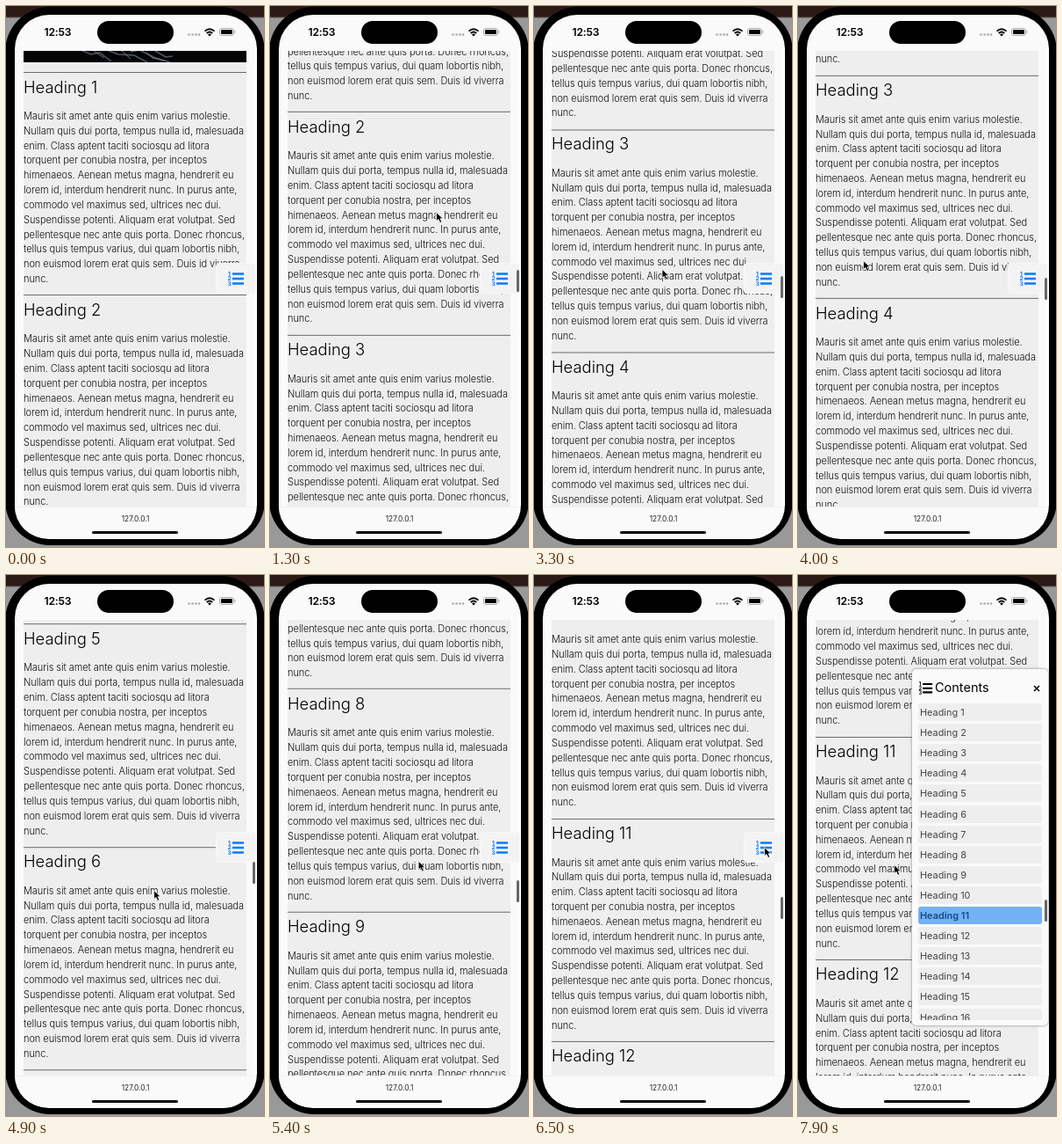
An HTML page for the animation above (8 s loop, 294 by 615 pixels).

```html
<!DOCTYPE html>
<html lang="en">
<head>
<meta charset="utf-8">
<title>Table of contents demo</title>
<style>
html, body { margin: 0; width: 100%; height: 100%; overflow: hidden; }
body { position: relative; background: linear-gradient(#2c1a16 12px, #999 14px); font-family: Inter, Roboto, sans-serif; color: #000; }
div, svg, h2, p { position: absolute; margin: 0; box-sizing: border-box; white-space: nowrap; }
#phone { left: -1px; top: 1px; width: 296px; height: 612px; border-radius: 51px; background: #000; }
#screen { left: 9.5px; top: 9.5px; width: 276px; height: 596px; border-radius: 39px; background: #fafafa; }
#view { left: 0; top: 51px; width: 294px; height: 518px; overflow: hidden; }
#page { left: 20px; top: 24px; width: 254px; height: 6000px; }
#page::before { content: ""; position: absolute; top: -311px; width: 100%; height: 6311px; background: #eee; }
#photo { top: -311px; width: 254px; height: 300px; overflow: hidden; background: #030405; }
.section { left: 0; width: 254px; height: 253px; border-top: 1px solid #6b6b6b; }
h2 { top: 3.5px; font: 300 18.4px/24px Inter, Roboto, sans-serif; }
p { top: 41px; font-size: 11px; font-weight: 300; line-height: 16.83px; letter-spacing: -.06px; color: #111; }
#clock { left: 43.5px; top: 22px; font-size: 12.2px; font-weight: 600; line-height: 16px; letter-spacing: -.2px; }
#island { left: 104px; top: 17px; width: 87px; height: 26px; border-radius: 13px; background: #000; }
#status { left: 206px; top: 22px; }
#bar { left: 10px; top: 569px; width: 275px; height: 36px; border-radius: 0 0 39px 39px; background: #fafafaf4; border-top: 1px solid #f1f1f1; font-size: 8.3px; line-height: 27px; text-align: center; color: #222; }
#home { left: 98px; top: 596.5px; width: 98px; height: 3px; border-radius: 2px; background: #000; }
#button { left: 239px; top: 292px; width: 46px; height: 35px; border-radius: 4px 0 0 4px; background: #f3f3f3; border: 1px solid #f8f8f8; }
#button svg { left: 12px; top: 8px; color: #087bff; }
#panel { left: 130px; top: 107px; width: 155px; height: 405px; border-radius: 5px; background: #fafafa; box-shadow: 0 0 3px #777; transform-origin: 100% 50%; }
#panel .icon { left: 7px; top: 14px; width: 17px; height: 17px; }
#title { left: 26px; top: 12px; font-size: 14.5px; line-height: 18px; }
#close { left: 138px; top: 18px; }
#list { left: 7px; top: 39px; width: 141px; height: 360px; overflow: hidden; }
.item { left: 0; width: 141px; height: 20px; padding-left: 2px; border-radius: 3px; background: #eee; color: #444; font-size: 10.9px; line-height: 20px; }
.item.on { background: #73b1f6; color: #164b82; font-weight: 600; }
#thumb { left: 281px; width: 2.5px; height: 25px; border-radius: 2px; background: #666; }
#cursor { left: 0; top: 0; }
</style>
</head>
<body>
<div id="phone"></div>
<div id="screen"></div>
<div id="view">
  <div id="page">
    <div id="photo">
      <svg width="254" height="300" fill="none" stroke="#4d5962" stroke-width="1.5">
        <path d="M65 286l12 5 10-2 13 10M92 285l16 6 18 1 15 8M122 288l10-2 18 9 17 5M150 287l12 7 8-1"/>
        <path stroke="#8b9296" stroke-width=".8" d="M80 287l12 8M112 287l10 9M140 289l7 6 14 3"/>
      </svg>
    </div>
  </div>
</div>
<div id="clock">12:53</div>
<div id="island"></div>
<svg id="status" width="60" height="16">
  <g fill="#aaa"><circle cx="2.5" cy="10.5" r="1.3"/><circle cx="6.5" cy="10.5" r="1.3"/><circle cx="10.5" cy="10.5" r="1.3"/><circle cx="14" cy="10.5" r="1.3"/></g>
  <g fill="none" stroke="#000" stroke-width="1.8"><path d="M20.5 6.7Q26 1.7 31.5 6.7M22.7 9Q26 6 29.3 9"/></g>
  <path d="M24 10.4Q26 8.8 28 10.4L26 12.4z"/>
  <rect x="37.5" y="3.5" width="16" height="8" rx="2.5" fill="none" stroke="#aaa"/>
  <rect x="39" y="5" width="13" height="5" rx="1.2"/>
  <path d="M55 6v3" stroke="#aaa"/>
</svg>
<div id="bar">127.0.0.1</div>
<div id="home"></div>
<div id="button"></div>
<div id="panel">
  <div id="title">Contents</div>
  <svg id="close" width="8" height="8"><path d="M1 1l6 6M7 1l-6 6" stroke="#000" stroke-width="1.5"/></svg>
  <div id="list"></div>
</div>
<div id="thumb"></div>
<svg id="cursor" width="12" height="16"><path d="M.6 .6V10.5L3 8.4 4.8 12.4 6.8 11.5 5 7.7H8.2z" fill="#000" stroke="#fff" stroke-width=".8"/></svg>
<script>
const $ = id => document.getElementById(id);
const LOOP = 8000, PITCH = 253.35, OPEN = 6600;
const LINES = [
  'Mauris sit amet ante quis enim varius molestie.',
  'Nullam quis dui porta, tempus nulla id, malesuada',
  'enim. Class aptent taciti sociosqu ad litora',
  'torquent per conubia nostra, per inceptos',
  'himenaeos. Aenean metus magna, hendrerit eu',
  'lorem id, interdum hendrerit nunc. In purus ante,',
  'commodo vel maximus sed, ultrices nec dui.',
  'Suspendisse potenti. Aliquam erat volutpat. Sed',
  'pellentesque nec ante quis porta. Donec rhoncus,',
  'tellus quis tempus varius, dui quam lobortis nibh,',
  'non euismod lorem erat quis sem. Duis id viverra',
  'nunc.'
].join('<br>');

const listIcon = `<svg class="icon" width="20" height="20" viewBox="0 0 20 20" fill="currentColor">
  <path d="M6 2.3h13v2.5H6zM6 7.8h13v2.5H6zM6 13.3h13v2.5H6z"/>
  <g font-size="6.6" font-weight="700"><text x="1" y="5.6">1</text><text x=".6" y="11.4">2</text><text x=".6" y="17.2">3</text></g></svg>`;
$('button').innerHTML = listIcon;
$('panel').insertAdjacentHTML('afterbegin', listIcon);

let sections = '', rows = '';
for (let i = 0; i < 20; i++) {
  sections += `<div class="section" style="top:${i * PITCH}px"><h2>Heading ${i + 1}</h2><p>${LINES}</p></div>`;
  rows += `<div class="item" style="top:${i * 23.1}px">Heading ${i + 1}</div>`;
}
$('page').insertAdjacentHTML('beforeend', sections);
$('list').innerHTML = rows;
const items = [...$('list').children];

// Rows of [time, value...], joined by a smooth curve that never overshoots
const scrollKeys = [[0, 0], [100, 0], [1300, 208], [2400, 381.5], [4000, 503], [4900, 1032], [5800, 2167], [6400, 2330], [6900, 2337], [7900, 2425], [8000, 2430]];
const cursorKeys = [[0, 190, 640], [100, 190, 640], [600, 190, 380], [1300, 189, 234], [2400, 250, 313], [4000, 74, 289], [4900, 168, 358], [5800, 169, 301], [6500, 262, 309], [7200, 112, 380], [7900, 109, 329], [8000, 109, 325]];

function curve(keys, t, k = 1) {
  const i = Math.max(0, keys.findIndex(p => p[0] > t) - 1);
  const slope = n => keys[n] && keys[n + 1] ? (keys[n + 1][k] - keys[n][k]) / (keys[n + 1][0] - keys[n][0]) : 0;
  const tangent = n => {
    const a = slope(n - 1), b = slope(n);
    return a * b > 0 ? 2 * a * b / (a + b) : 0;
  };
  const [p, q] = [keys[i], keys[i + 1]], h = q[0] - p[0], u = (t - p[0]) / h, v = 1 - u;
  return p[k] * v * v * (1 + 2 * u) + q[k] * u * u * (3 - 2 * u) + h * u * v * (v * tangent(i) - u * tangent(i + 1));
}

function draw(now) {
  const t = now % LOOP, scroll = curve(scrollKeys, t);
  $('page').style.transform = `translateY(${-scroll}px)`;
  $('thumb').style.top = 293.6 + scroll * .0311 + 'px';
  $('thumb').style.opacity = Math.min(1, Math.max(0, (t - 100) / 150));
  $('cursor').style.transform = `translate(${curve(cursorKeys, t, 1)}px, ${curve(cursorKeys, t, 2)}px)`;
  const open = Math.min(1, Math.max(0, (t - OPEN) / 150));
  $('panel').style.opacity = open;
  $('panel').style.transform = `scale(${.3 + .7 * open})`;
  $('button').style.opacity = 1 - open;
  const current = Math.floor((225 + scroll) / PITCH);
  items.forEach((item, i) => item.classList.toggle('on', i === current));
}

const start = performance.now();
function tick() {
  draw(performance.now() - start);
  requestAnimationFrame(tick);
}
tick();
</script>
</body>
</html>
```
